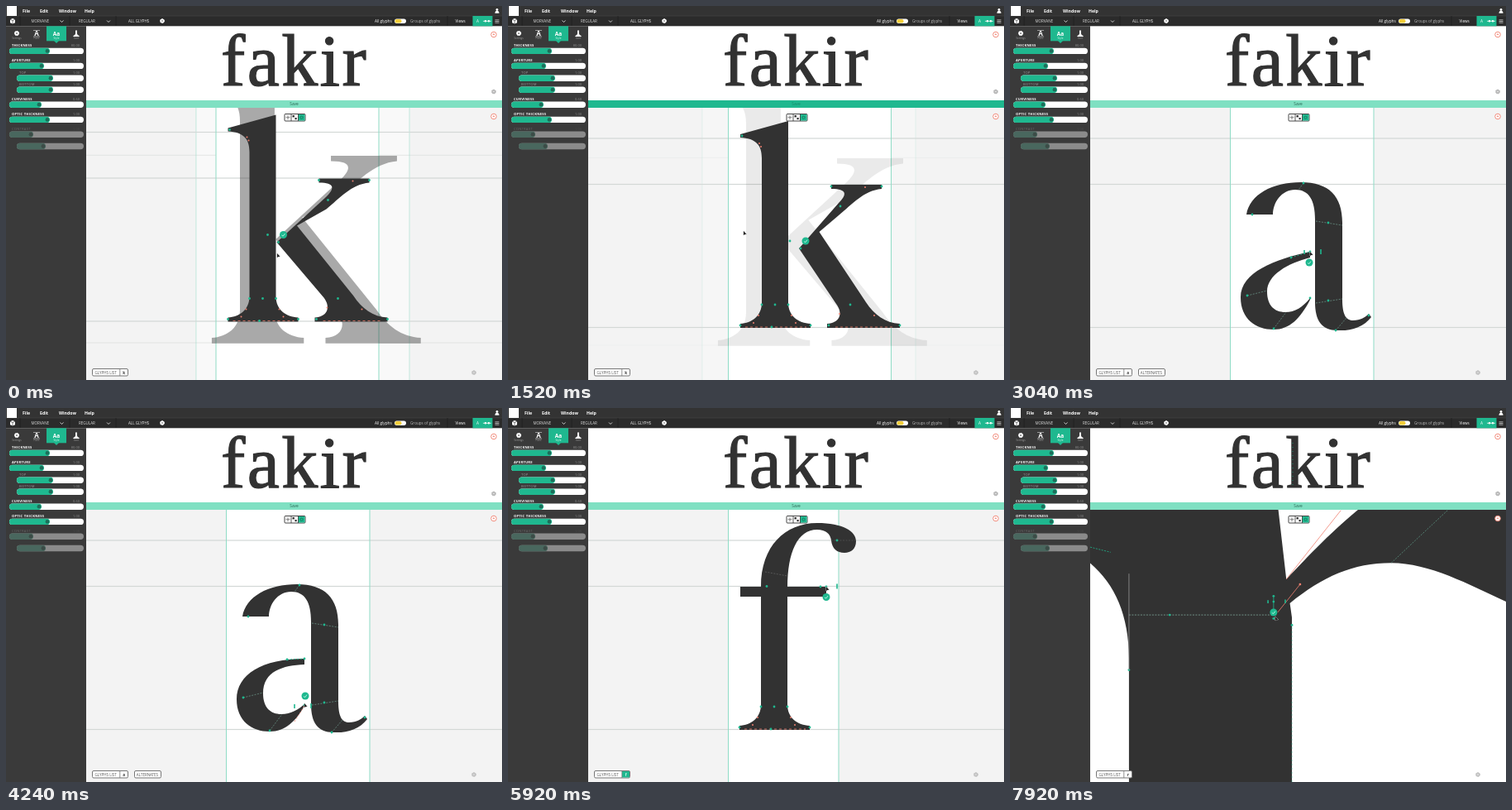
Animation of 600 by 452 pixels, one loop 8000 ms. Source, as an HTML page with a canvas:

```html
<!DOCTYPE html>
<html lang="en">
<head>
<meta charset="utf-8">
<title>Glyph editor</title>
<style>
  html, body { margin: 0; width: 100%; height: 100%; overflow: hidden; background: #fff; }
  canvas, svg { position: absolute; left: 0; top: 0; width: 600px; height: 452px; display: block; }
  text { font-family: "Open Sans", "Noto Sans", sans-serif; }
  .word { font-family: "Liberation Serif", "Noto Serif", serif; letter-spacing: 2.4px; }
</style>
</head>
<body>
<canvas id="work"></canvas>
<svg id="ui" viewBox="0 0 600 452"></svg>
<script>
const LOOP = 8000, STEP = 80;
const GREEN = '#1fb88f', MINT = '#7fe0c2', INK = '#323232', RED = '#f08070';

// ---------- interface ----------
const rect = (x, y, w, h, fill, more = '') =>
  `<rect x="${x}" y="${y}" width="${w}" height="${h}" fill="${fill}" ${more}/>`;
const disc = (x, y, r, fill, more = '') =>
  `<circle cx="${x}" cy="${y}" r="${r}" fill="${fill}" ${more}/>`;
const line = (d, color, w = 1, more = '') =>
  `<path d="${d}" fill="none" stroke="${color}" stroke-width="${w}" ${more}/>`;
const label = (x, y, s, size, fill = '#fff', more = '') =>
  `<text x="${x}" y="${y}" font-size="${size}" fill="${fill}" ${more}>${s}</text>`;
const BOLD = 'font-weight="700"', MID = 'text-anchor="middle"';

function slider(name, value, x, y, knob, level) {
  const off = level === 'off', top = level === 'top';
  const w = 94 - x, h = 7.4;
  return label(x + 3, y - 1.6, name, 4.1, top ? '#fff' : off ? '#686868' : '#999',
      `letter-spacing=".25" ${top ? BOLD : ''}`) +
    label(89, y - 1.6, value, 4, off ? '#4c4c4c' : '#8c8c8c', 'text-anchor="end"') +
    rect(x, y, w, h, off ? '#8b8b8b' : '#fff', 'rx="3.7"') +
    rect(x, y, knob + 3 - x, h, off ? '#49675e' : GREEN, 'rx="3.7"') +
    disc(knob, y + 3.7, 2.4, off ? '#3c4c47' : '#1d6e5a');
}

function gear(x, y, color, r = 2.3) {
  return disc(x, y, r, 'none', `stroke="${color}" stroke-width="1.9"`) +
    disc(x, y, r + .8, 'none', `stroke="${color}" stroke-width="1" stroke-dasharray="1.3 1.1"`);
}

function alertRing(y) {
  return disc(590, y, 3.3, '#fff', `stroke="${RED}" stroke-width=".9"`) +
    line(`M590 ${y - 1.6}V${y + .4}M588.8 ${y}H591.2`, RED, .7);
}

function person(x, y, s) {
  return disc(x, y - 1.6 * s, 1.6 * s, '#fff') +
    `<path d="M${x - 2.8 * s} ${y + 3 * s}q0-3 ${2.8 * s}-3t${2.8 * s} 3z" fill="#fff"/>`;
}

function buildUi() {
  const menu = [[20, 'File'], [41, 'Edit'], [64, 'Window'], [95, 'Help']];
  const sliders = [
    ['THICKNESS', '80.00', 4, 50.7, 50, 'top'], ['APERTURE', '1.00', 4, 68.7, 43, 'top'],
    ['TOP', '1.00', 13, 83.5, 54, 'sub'], ['BOTTOM', '1.00', 13, 97.5, 54, 'sub'],
    ['CURVINESS', '0.60', 4, 115.5, 40, 'top'], ['OPTIC THICKNESS', '1.00', 4, 133.7, 50, 'top'],
    ['CONTRAST', '1.00', 4, 151.5, 30, 'off'], ['', '', 13, 165.8, 45, 'off']
  ];
  let s = rect(97, 24, 503, 90, '#fff') +
    rect(97, 114, 503, 9, MINT, 'id="band"') +
    label(348.5, 120, 'Save', 4.8, '#286653', `${MID} id="save"`) +
    label(260, 96, 'fakir', 88, INK, `class="word" stroke="${INK}" stroke-width="1.2"`) +
    line('M342 42V94', GREEN, 1, 'stroke-dasharray="1 4" opacity=".7" id="hint"') +
    alertRing(34.5) + alertRing(133.5) +
    gear(590, 103.5, '#b9b9b9', 1.6) + gear(566, 443, '#c2c2c2', 1.6);

  // top bars
  s += rect(0, 0, 600, 12, '#333') + rect(0, 12, 600, 12.3, '#2b2b2b') +
    line('M0 12H600', '#434343', .7) + rect(1, 0, 12, 12, '#fff');
  for (const [x, name] of menu) s += label(x, 8, name, 5.2, '#fff', BOLD);
  s += person(594, 6, .9) +
    `<path d="M5 16.3l3-1.2 3 1.2v4l-3 1.2-3-1.2z" fill="#fff"/>` +
    line('M8 17.5V21.5M5 16.3L8 17.5L11 16.3', '#2b2b2b', .6) +
    label(30.5, 20, 'MORVANE', 4.5, '#ddd') + label(88, 20, 'REGULAR', 4.5, '#ddd') +
    label(148, 20, 'ALL GLYPHS', 4.5, '#eee') +
    line('M65.5 17.5l2 2 2-2M122 17.5l2 2 2-2', '#ddd', .9) +
    line('M17 12V24M77 12V24M133 12V24M534 12V24', '#1f1f1f', .8) + gear(189, 18, '#fff', 1.6) +
    label(446, 20, 'All glyphs', 4.7, '#fff') + label(489, 20, 'Groups of glyphs', 4.6, '#bbb') +
    rect(470, 15.5, 14, 5.4, '#fff', 'rx="2.7"') + rect(470.5, 16, 8, 4.4, '#f5cf3a', 'rx="2.2"') +
    label(543.5, 20, 'Views', 4.6, '#fff') +
    rect(564.5, 12, 24, 12.3, GREEN) + label(570.5, 20, 'A', 4.8, '#fff', MID) +
    line('M577 18.3H587', '#fff', .7) + disc(580, 18.3, 1.2, '#fff') + disc(584, 18.3, 1.2, '#fff') +
    line('M591.5 16.8h5M591.5 18.5h5M591.5 20.2h5', '#ccc', .8);

  // side panel
  s += rect(0, 24.3, 97, 428, '#3a3a3a') + rect(49, 24.3, 24, 18, GREEN) +
    `<path d="M58 42h6l-3 3z" fill="${GREEN}"/>` + gear(13, 33, '#fff', 1.8) +
    label(37, 36, 'A', 8, '#fff', `${MID} ${BOLD}`) + line('M33 29.5H41M33 37H41', '#ddd', .6) +
    label(61, 35.5, 'Aa', 6.5, '#fff', `${MID} ${BOLD}`) +
    `<path d="M84 29.5h2v4q.3 2 2.6 2.4v1h-7.2v-1q2.3-.4 2.6-2.4z" fill="#fff"/>`;
  [['Settings', 13], ['Func', 37], ['Style', 61], ['Serif', 85]].forEach(([n, x], i) => {
    s += label(x, 40, n, 3.1, i === 2 ? '#d9fff3' : '#999', MID);
  });
  s += sliders.map(a => slider(...a)).join('');

  // work area tools
  s += rect(337, 130.5, 25, 8.5, '#fff', `stroke="${INK}" stroke-width=".9" rx="1"`) +
    rect(353.5, 131, 8, 7.5, GREEN) + line('M345 130.5V139M353.5 130.5V139', INK, .8) +
    line('M341 132.2V137.2M338.5 134.7H343.5', '#555', .7) +
    rect(346.5, 132, 2.4, 2.4, INK) + rect(349.5, 135, 2.2, 2.2, INK) +
    disc(357.5, 134.7, 1.6, 'none', 'stroke="#137457" stroke-width=".8"') +
    rect(104.5, 438.5, 43, 8.5, '#fff', 'stroke="#777" rx="1.5"') +
    rect(138, 439, 9, 7.5, GREEN, 'id="cell"') + line('M137.8 438.5V447', '#777', .8) +
    label(107.5, 444.6, 'GLYPHS LIST', 4.5, '#555') +
    label(142.7, 444.6, 'k', 4.6, '#333', `${MID} ${BOLD} id="cellText"`) +
    '<g id="alt">' + rect(155.5, 438.5, 32, 8.5, '#fff', 'stroke="#777" rx="1.5"') +
    label(157.8, 444.6, 'ALTERNATES', 4.5, '#555') + '</g>';
  ui.innerHTML = s;
}

// ---------- motion helpers ----------
const mix = (a, b, p) => a + (b - a) * p;
const part = (t, a, b) => Math.min(1, Math.max(0, (t - a) / (b - a)));
const ease = p => p * p * (3 - 2 * p);

function along(keys, t) {
  const i = keys.findIndex(k => k[0] > t);
  if (i < 0) return keys[keys.length - 1].slice(1);
  if (i === 0) return keys[0].slice(1);
  const a = keys[i - 1], b = keys[i], p = ease(part(t, a[0], b[0]));
  return [mix(a[1], b[1], p), mix(a[2], b[2], p)];
}

const POINTER = [[0, 328, 299], [1440, 285, 272], [1520, 285, 272], [1840, 348, 200], [3040, 363, 297],
  [3440, 363, 302], [4160, 361, 357], [4640, 361, 357], [5360, 371, 216], [5840, 385, 216],
  [6320, 385, 216], [7040, 327, 258], [7440, 327, 258], [7840, 321, 252]];

// ---------- glyph outlines ----------
// stem foot from the right side to the left side
const foot = (l, r) => `L${r} 358C${r} 375 ${r + 12} 383 ${r + 27} 384V389H${l - 26}V384C${l - 12} 383 ${l} 375 ${l} 358`;

const kPath = j => `M281 155L339 139${foot(307, 339)}V184C307 168 300 160 281 159Z
  M${j} 293L400 238C410 228 411 221 391 221V216H452V221
  C430 223 416 240 400 253L${j + 24.5} 273L433 358C443 373 456 383 474 384V389H386V384
  C401 383 406 372 397 360Z`;

const aPath = p => {
  const x = mix(363, 361, p), top = mix(297, 303, p), low = mix(353, 358, p);
  return `M286 252C290 228 317 213 352 213C386 213 402 230 402 262V355C402 374 407 380 415 380
  C424 380 430 376 434 372L437 376C428 388 412 393 396 392C377 392 369 380 369 358V258
  C369 235 362 222 345 222C328 222 318 238 318 252Z
  M${x} ${top}C${mix(320, 310, p)} ${mix(306, 303, p)} 279 322 279 352C279 378 297 391 319 391
  C338 391 351 378 ${x} ${low + 2}V${low}C354 364 345 370 333 370C320 370 311 362 311 345
  C311 ${mix(325, 318, p)} ${mix(336, 335, p)} 311 ${x} ${top + 7}Z`;
};

const fPath = end => `M306 216C306 167 335 139 374 139C405 139 421 149 421 161C421 170 415 175 407 175
  C398 175 392 170 391 160C390 152 384 147 374 147C350 147 338 175 338 216H${end}V228H338
  ${foot(306, 338)}V228H281V216Z`;

const R_PATH = `M282 227L335.5 211L338.9 240.5C347 232 364 213 386 213C402 213 411 223 411 233
  C411 243 403 249 396 249C385 249 372 237.3 359.5 237.3C352 237.3 346 240 339.6 245.2L340 248
  ${foot(308, 340)}V256C308 240 298 232 282 231Z`;

// ---------- drawing ----------
const c = work.getContext('2d');
const dpr = window.devicePixelRatio || 1;
work.width = 600 * dpr;
work.height = 452 * dpr;

let view = { s: 1, x: 0, y: 0 };
const sx = x => view.x + x * view.s, sy = y => view.y + y * view.s;

function shape(d, color) {
  c.save();
  c.translate(view.x, view.y);
  c.scale(view.s, view.s);
  c.fillStyle = color;
  c.fill(new Path2D(d));
  c.restore();
}

function seg(x1, y1, x2, y2, color, dash = [], w = .8) {
  c.beginPath();
  c.moveTo(sx(x1), sy(y1));
  c.lineTo(sx(x2), sy(y2));
  c.setLineDash(dash);
  c.lineWidth = w;
  c.strokeStyle = color;
  c.stroke();
  c.setLineDash([]);
}

function dots(list, color = GREEN, r = 1.4) {
  c.fillStyle = color;
  for (const [x, y] of list) {
    c.beginPath();
    c.arc(sx(x), sy(y), r, 0, 7);
    c.fill();
  }
}

function handle(x, y) {
  dots([[x, y]], GREEN, 4.5);
  c.strokeStyle = '#d5fff1';
  c.lineWidth = .8;
  c.beginPath();
  c.moveTo(sx(x) - 2, sy(y) + .5);
  c.lineTo(sx(x) - .3, sy(y) + 1.6);
  c.lineTo(sx(x) + 2, sy(y) - 1.4);
  c.stroke();
}

// column and guide lines in the current view
function guides(right, alpha = 1) {
  c.globalAlpha = alpha;
  c.fillStyle = '#fff';
  c.fillRect(sx(266.5), 123, (right - 266.5) * view.s, 329);
  for (const y of [160, 215.5, 388.5]) {
    c.fillStyle = '#d3d8d6';
    c.fillRect(97, sy(y) - .6, 503, 1.2);
  }
  for (const x of [266.5, right]) {
    c.fillStyle = '#8fdcc6';
    c.fillRect(sx(x) - .5, 123, 1, 329);
  }
  c.globalAlpha = 1;
}

function footMarks(l, r) {
  seg(l - 20, 388, r + 22, 388, RED, [3, 3]);
  dots([[l, 361], [(l + r) / 2, 361], [r, 361], [l - 26, 386], [r + 27, 386], [l + 12, 388]]);
  dots([[l - 4, 374], [r + 4, 374], [l - 10, 383], [r + 9, 383]], RED, 1);
}

function drawK(t) {
  const p = part(t, 0, 1520), j = mix(340, 352, p);
  const main = { s: 1, x: mix(-12.5, 0, p), y: mix(-7.5, 0, p) };
  const ghost = { s: 1.31, x: mix(283, 288, p) - 307 * 1.31, y: mix(407, 410, p) - 388.5 * 1.31 };
  const a = t > 1520 ? 0 : mix(.42, .1, p);
  if (a) {
    view = ghost;
    guides(463.5, mix(.5, .2, p));
  }
  view = main;
  guides(463.5);
  if (a) {
    view = ghost;
    c.globalAlpha = a;
    shape(kPath(340), INK);
    c.globalAlpha = 1;
  }
  view = main;
  shape(kPath(j), INK);
  footMarks(307, 339);
  seg(396, 388, 466, 388, RED, [3, 3]);
  dots([[283, 157], [391, 218], [452, 218], [414, 361], [388, 386], [474, 386], [j + 2, 293], [j - 11, 284], [402, 242]]);
  dots([[304, 166], [306, 170], [401, 372], [443, 374], [432, 219]], RED, 1);
  handle(j + 8, 284);
}

function drawA(t) {
  const p = ease(part(t, 3120, 3520)), q = ease(part(t, 3520, 4160));
  const top = mix(297, 303, p), end = mix(363, 361, p);
  guides(440);
  shape(aPath(p), INK);
  const thin = [[355, 214, 349, 222], [370, 260, 402, 265], [370, 359, 402, 354],
    [287, 350, 311, 344], [319, 390, 334, 370], [394, 392, 407, 377]];
  for (const s of thin) seg(...s, '#6f9c8f', [2, 1.5], .7);
  seg(340, 304, end, top, GREEN, [2, 2]);
  dots([[355, 214], [385, 262], [385, 356], [287, 350], [319, 390], [293, 252], [394, 392], [434, 374],
    [340, 304], [end, top], [end, mix(353, 359, p)]]);
  const mx = mix(376, 369, q), my = mix(297, 360, q);
  seg(mx, my - 3, mx, my + 3, GREEN, [], 1.6);
  seg(mx - 20, my - 2, mx - 20, my + 3, GREEN, [], 1.6);
  if (q > .5) seg(349, 379, 361, 360, RED, [2, 2]);
  handle(362, mix(310, 348, q));
}

function drawF(t) {
  const end = mix(370, 385, ease(part(t, 5360, 5840)));
  guides(400);
  shape(fPath(end), INK);
  footMarks(306, 338);
  seg(311, 198, 338, 203, '#666', [2, 1.5], .7);
  seg(391, 160, 420, 160, '#555', [2, 1.5], .7);
  dots([[398, 160], [313, 215.5], [end, 216], [end - 7, 216]]);
  seg(end + 13, 212.5, end + 13, 218.5, GREEN, [], 1.6);
  handle(end, 228.5);
}

function drawR(t) {
  const s = Math.pow(6.16, ease(part(t, 7520, 7840)));
  view = { s, x: 339.8 * (1 - s), y: 247 * (1 - s) };
  guides(415);
  shape(R_PATH, INK);
  footMarks(308, 340);
  seg(308, 247.5, 337, 247.5, '#7fa89b', [2, 1.5], .8);
  seg(359.5, 237.3, 385, 213.5, '#5c9583', [2, 1.5], .8);
  seg(340, 250, 340, 361, GREEN, [1, 4], .8);
  dots([[385, 214], [400, 247], [316, 247.5], [329, 212], [335, 212], [282, 229], [308, 258.3], [340, 249.5]]);
  if (s > 4) {
    seg(308, 239.4, 308, 258.3, '#999');
    seg(300.4, 234.2, 304.4, 235.2, GREEN, [2, 1.5]);
    seg(338.9, 240.5, 349.6, 227, RED);
    seg(337.2, 247, 341.6, 241.5, RED);
    dots([[341.6, 241.5]], RED);
    seg(336.4, 243.8, 336.4, 247, GREEN);
    dots([[336.4, 243.8], [336.4, 244.9], [336.4, 248.2]]);
    seg(335.3, 244.6, 335.3, 245.2, GREEN, [], 1.6);
    seg(338.7, 244.5, 338.7, 245.2, GREEN, [], 1.6);
    handle(336.4, 247);
  } else {
    dots([[336, 246], [338, 248]]);
    dots([[304, 236], [307, 240]], RED, 1);
  }
}

function pointer(t) {
  const [x, y] = along(POINTER, t);
  c.beginPath();
  c.moveTo(x, y);
  c.lineTo(x, y + 5);
  c.lineTo(x + 1.3, y + 3.9);
  c.lineTo(x + 3.4, y + 3.7);
  c.closePath();
  c.fillStyle = '#222';
  c.strokeStyle = '#ccc';
  c.lineWidth = .8;
  c.stroke();
  c.fill();
}

const SCENES = [[0, 'k', drawK], [1840, 'a', drawA], [5040, 'f', drawF], [6640, 'r', drawR]];
buildUi();
const get = id => document.getElementById(id);
const show = (id, on) => { get(id).style.display = on ? '' : 'none'; };

function render(time) {
  const t = Math.floor(time % LOOP / STEP) * STEP;
  const [, name, draw] = SCENES.filter(s => s[0] <= t).pop();
  c.setTransform(dpr, 0, 0, dpr, 0, 0);
  c.fillStyle = '#f3f3f3';
  c.fillRect(0, 0, 600, 452);
  c.save();
  c.beginPath();
  c.rect(97, 123, 503, 329);
  c.clip();
  view = { s: 1, x: 0, y: 0 };
  draw(t);
  pointer(t);
  c.restore();

  const hover = t >= 1360 && t < 1840;
  const lit = name === 'f' || (name === 'r' && t < 7600);
  get('band').setAttribute('fill', hover ? GREEN : MINT);
  get('save').setAttribute('fill', hover ? '#158a6a' : '#286653');
  get('cellText').textContent = name;
  get('cellText').setAttribute('fill', lit ? '#d9fff3' : '#333');
  show('cell', lit);
  show('alt', name === 'a');
  show('hint', name === 'r');
}

const start = performance.now();
function tick() {
  render(performance.now() - start);
  requestAnimationFrame(tick);
}
tick();
</script>
</body>
</html>
```
